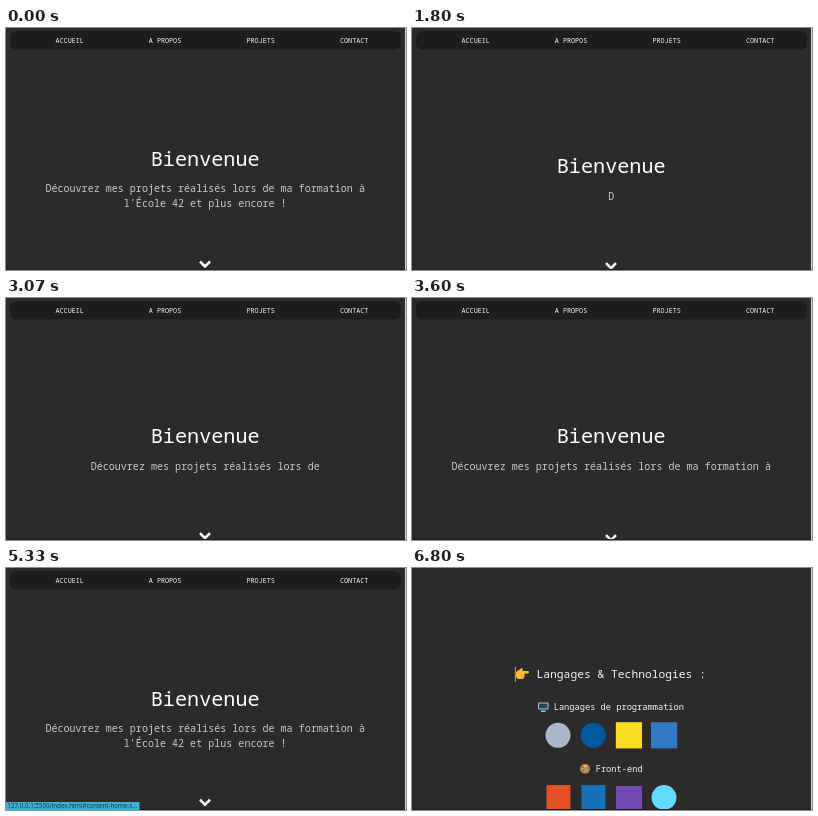
An HTML page that plays this animation: 400x242 px, repeating every 8000 ms.

```html
<!DOCTYPE html>
<html lang="fr">
<head>
<meta charset="utf-8">
<title>Bienvenue</title>
<style>
  html, body { margin: 0; width: 100%; height: 100%; overflow: hidden; background: #2d2a2c; }
  svg { display: block; font-family: "Noto Sans Mono", "DejaVu Sans Mono", monospace; fill: #f4f4f4; }
  .mid { text-anchor: middle; }
  .nav { font-size: 6.75px; }
  .title { font-size: 20.2px; fill: #fff; }
  .sub { font-size: 10.05px; fill: #c9c8c8; }
  .h2 { font-size: 11.3px; }
  .h3 { font-size: 8.7px; }
  .status { font: 6.2px "Open Sans", "Noto Sans", sans-serif; fill: #12303a; }
</style>
</head>
<body>
<svg width="400" height="242" viewBox="0 0 400 242">
  <rect width="400" height="242" fill="#2d2a2c"/>
  <g id="page">
    <rect x="4" y="3" width="391" height="18.500" rx="6" fill="#1e1c1e"/>
    <rect id="hover" x="330" y="3" width="36.500" height="18" rx="4" fill="#292729"/>
    <g class="nav">
      <text x="49.500" y="15">ACCUEIL</text>
      <text x="142.800" y="15">A PROPOS</text>
      <text x="240.500" y="15">PROJETS</text>
      <text x="334" y="15">CONTACT</text>
    </g>
    <path id="underline" d="M334 16.200h28.800" stroke="#f4f4f4" stroke-width=".7"/>
    <text id="title" class="title mid" x="199.200"></text>
    <text id="line1" class="sub mid" x="199.200"></text>
    <text id="line2" class="sub mid" x="199.200" y="179"></text>
    <path id="arrow" d="M-5-2.500 0 2.500 5-2.500" fill="none" stroke="#fff" stroke-width="2.600"/>

    <g transform="translate(0 267)">
      <g id="heads">
        <path d="M103.300 98.500v15.500" stroke="#d8d8d8" stroke-width=".7"/>
        <g fill="#fbc02d">
          <rect x="104" y="102.500" width="8.500" height="8.500" rx="3"/>
          <rect x="106" y="103" width="11" height="2.600" rx="1.300"/>
          <path d="M106 103l3.500-3 1.500 1-2 3z"/>
        </g>
        <path d="M109 107h3.500M109 109h3" stroke="#d98c16" stroke-width=".6"/>
        <text class="h2" x="124.500" y="110">Langages &amp; Technologies :</text>

        <rect x="126" y="134.500" width="10.500" height="7" rx=".8" fill="#b4bec6"/>
        <rect x="127" y="135.500" width="8.500" height="5" fill="#25465a"/>
        <path d="M129 143.300h4.500" stroke="#b4bec6" stroke-width="1.500"/>
        <text class="h3" x="141.700" y="142">Langages de programmation</text>

        <ellipse cx="173" cy="200.800" rx="5" ry="4.800" fill="#c98a5c"/>
        <circle cx="170.500" cy="199" r="1" fill="#e53935"/>
        <circle cx="173.500" cy="198" r="1" fill="#fdd835"/>
        <circle cx="176" cy="200.500" r="1" fill="#43a047"/>
        <circle cx="171" cy="202.500" r="1" fill="#1e88e5"/>
        <text class="h3" x="183.700" y="203.500">Front-end</text>
      </g>
      <circle cx="146" cy="167.300" r="12.500" fill="#a9b9cb"/>
      <circle cx="181.300" cy="167.300" r="12.500" fill="#00599c"/>
      <rect x="203.800" y="154.200" width="26.200" height="26.200" fill="#f7df1e"/>
      <rect x="239" y="154.200" width="26.200" height="26.200" fill="#3178c6"/>
      <rect x="134.500" y="217" width="24" height="26" fill="#e34f26"/>
      <rect x="169.500" y="217" width="24" height="26" fill="#1572b6"/>
      <rect x="204" y="218" width="26" height="24" fill="#6f4bb0"/>
      <circle cx="252" cy="229.500" r="12.500" fill="#61dafb"/>
    </g>
  </g>
  <rect y="241" width="400" height="1" fill="#241c1f"/>
  <rect x="399" width="1" height="242" fill="#d8d8d8"/>
  <g id="status">
    <rect id="bar" y="234" height="8" fill="#3eb2d4"/>
    <text id="url" class="status" x="1.500" y="240.300"></text>
  </g>
</svg>
<script>
const LOOP = 8000, STEP = 1000 / 15, RELOAD = 730;
const TITLE = "Bienvenue";
const INTRO = "Découvrez mes projets réalisés lors de ma formation à l'École 42 et plus encore !";
const WRAP = 53, LINE_MAX = 55;
const $ = id => document.getElementById(id);
const clamp = x => Math.min(1, Math.max(0, x));
const show = (id, on) => $(id).setAttribute("visibility", on ? "visible" : "hidden");
const within = (t, a, b) => t >= a && t < b;

function bezier(x1, y1, x2, y2) {
  const at = (a, b, u) => 3 * a * u * (1 - u) ** 2 + 3 * b * u * u * (1 - u) + u ** 3;
  return x => {
    let lo = 0, hi = 1;
    for (let i = 0; i < 20; i++) {
      const u = (lo + hi) / 2;
      if (at(x1, x2, u) < x) lo = u; else hi = u;
    }
    return at(y1, y2, lo);
  };
}
const ease = bezier(.25, .1, .25, 1);
const easeInOut = bezier(.42, 0, .58, 1);

// Height of the bouncing arrow above its resting place
const BOUNCE = [[0, 0], [.2, 0], [.4, 6.3], [.5, 0], [.6, 3.2], [.8, 0], [1, 0]];
function bounce(ms) {
  const p = ms / 2000 % 1;
  const i = BOUNCE.findIndex(k => k[0] > p);
  const [a, from] = BOUNCE[i - 1], [b, to] = BOUNCE[i];
  return from + (to - from) * ease((p - a) / (b - a));
}

const typed = (text, t, start, pace) =>
  text.slice(0, Math.max(0, Math.floor((t - start) / pace)));

function drawText(t) {
  const old = t < RELOAD;
  const intro = old ? INTRO : typed(INTRO, t, 1733, 34.6);
  const split = intro.length > LINE_MAX ? WRAP : LINE_MAX;
  const lift = split === WRAP ? 20 : intro ? 12.5 : 0;
  $("title").textContent = old ? TITLE : typed(TITLE, t, 820, 35);
  $("title").setAttribute("y", 157.5 - lift);
  $("line1").textContent = intro.slice(0, split).trim();
  $("line1").setAttribute("y", 184 - lift);
  $("line2").textContent = intro.slice(split).trim();
}

function drawStatus(t) {
  const contact = within(t, 1200, 1800);
  show("status", contact || within(t, 5100, 6000));
  $("url").textContent = "127.0.0.1:5500/index.html#" + (contact ? "contact" : "content-home-s…");
  $("bar").setAttribute("width", contact ? 106 : 133.5);
}

function draw(now) {
  const t = Math.floor((now % LOOP + 4) / STEP) * STEP % LOOP;
  const hover = within(t, 1000, 1500);
  const scroll = 267 * easeInOut(clamp((t - 5344) / 560));
  const rise = bounce(t < RELOAD ? t + 570 : t - 560);
  drawText(t);
  drawStatus(t);
  show("hover", hover);
  show("underline", hover);
  $("arrow").setAttribute("transform", `translate(199 ${240.5 - rise})`);
  $("page").setAttribute("transform", `translate(0 ${-scroll})`);
  $("heads").setAttribute("opacity", ease(clamp((t - 5800) / 1000)));
}

const start = performance.now();
function frame() {
  draw(performance.now() - start);
  requestAnimationFrame(frame);
}
frame();
</script>
</body>
</html>
```
